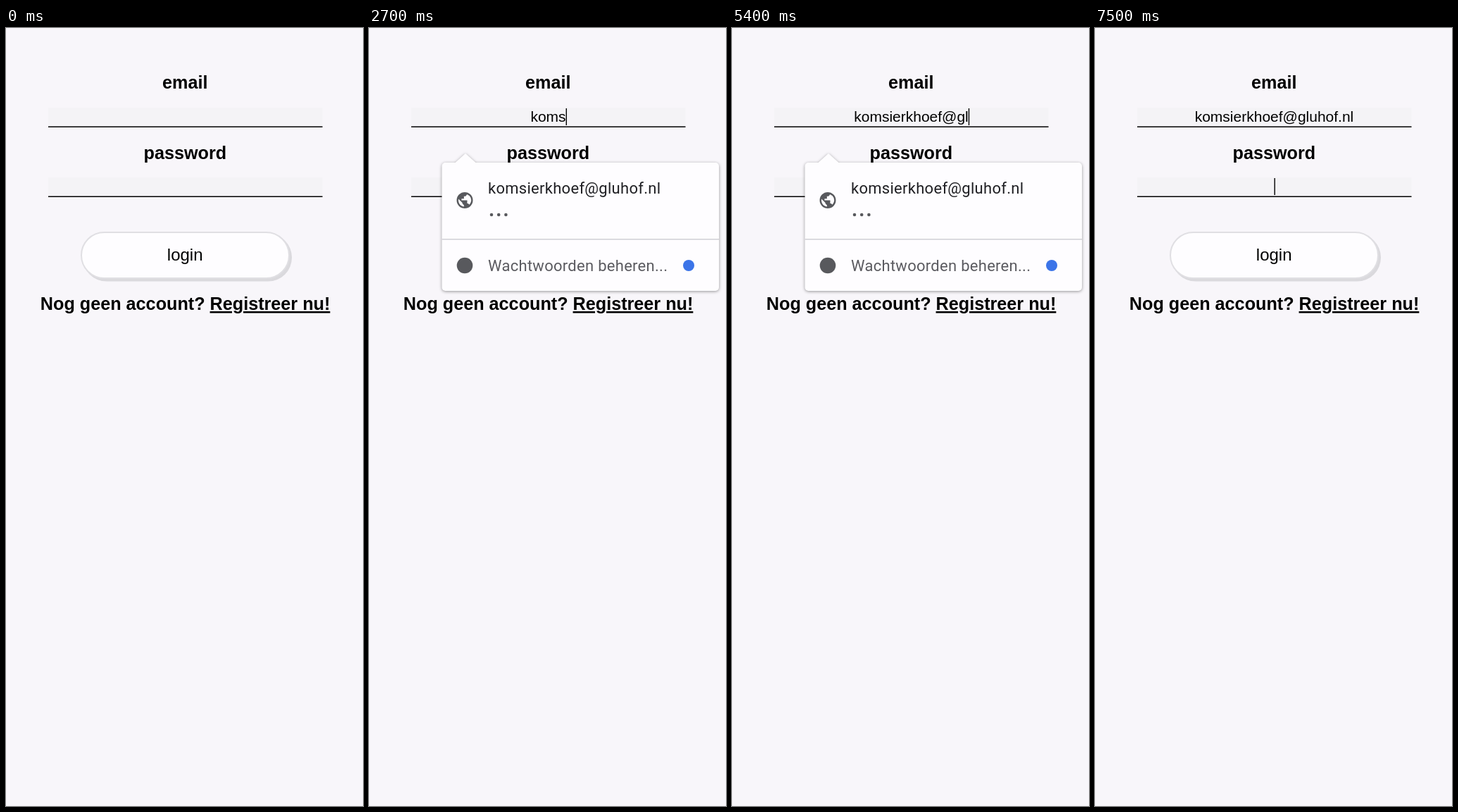
Write an HTML page that moves like this. It is 507 px wide and 1104 px high and loops after 8000 ms.

```html
<!DOCTYPE html>
<html lang="nl">
<head>
<meta charset="utf-8">
<title>Login</title>
<style>
  html, body { margin: 0; width: 100%; height: 100%; overflow: hidden; background: #f8f6fa; }
  svg { display: block; width: 507px; height: 1104px; }
  text { font-family: "Liberation Sans", Arial, sans-serif; text-anchor: middle; }
  .bold { font-size: 25.2px; font-weight: bold; }
  .login { font-size: 24px; }
  .typed { font-size: 21px; }
  .link { text-decoration: underline 1.8px; text-underline-offset: 2px; }
  .popup text { font: 22px Roboto, sans-serif; letter-spacing: .28px; text-anchor: start; }
  .panel { fill: #fefdff; filter: drop-shadow(0 1px 2px #0006); }
  .icon { fill: #58595d; }
</style>
</head>
<body>
<svg viewBox="0 0 507 1104">
  <defs>
    <g id="field">
      <rect width="389.5" height="27" fill="#f4f3f6"/>
      <rect y="26.5" width="389.5" height="1.5"/>
    </g>
  </defs>

  <text class="bold" x="254.3" y="86">email</text>
  <use href="#field" x="60" y="113"/>
  <text class="bold" x="254.3" y="185.5">password</text>
  <use href="#field" x="60" y="212"/>

  <rect x="109" y="292" width="297" height="67.5" rx="33.7" fill="#dad9dd"/>
  <rect x="107" y="290" width="295" height="65" rx="32.5" fill="#fefdff" stroke="#e0dfe3" stroke-width="2"/>
  <text class="login" x="254.2" y="330">login</text>
  <text class="bold" x="254.6" y="400">Nog geen account? <tspan class="link">Registreer nu!</tspan></text>

  <text class="typed" id="typed" x="254.5" y="133"></text>
  <rect id="caret" width="1.4" height="24"/>

  <g class="popup" id="popup">
    <g class="panel">
      <rect x="103.5" y="191" width="393.5" height="182" rx="5"/>
      <path d="M122 191.5L137 178L152 191.5Z"/>
    </g>
    <rect x="103.5" y="299" width="393.5" height="1.6" fill="#d3d2d7"/>
    <g transform="translate(122.2 230.7) scale(1.15)">
      <circle class="icon" cx="12" cy="12" r="9"/>
      <path fill="#fefdff" d="M3.5 9.5L9 15V16L11 18V20.5L5 18Z M18 17.5L16 16H15V12H8V10H11V7H13L15 4.5L20 7.5L21 12Z"/>
      <circle cx="12" cy="12" r="9" fill="none" stroke="#58595d" stroke-width="2"/>
    </g>
    <text id="saved" x="169" y="235" fill="#202024"></text>
    <path d="M174 265h22" fill="none" stroke="#58595d" stroke-width="4.6" stroke-linecap="round" stroke-dasharray="0 10.2"/>
    <circle class="icon" cx="136" cy="337" r="11.3"/>
    <text x="169" y="345" fill="#5b5b60">Wachtwoorden beheren...</text>
    <circle cx="454" cy="337" r="8" fill="#3b74e8"/>
  </g>

  <circle id="pointer" r="16" fill="#8a888c" stroke="#fdfcfe" stroke-width="1.5"/>
</svg>
<script>
  const LOOP = 8000, CENTER = 254.5;
  const ADDRESS = "komsierkhoef@gluhof.nl";
  const OPEN = 900, TYPING = 1800, SUBMIT = 7500;

  // Runs of evenly spaced key presses, with pauses between them
  const BURSTS = [
    { from: TYPING, to: 2100, keys: 3 },
    { from: 2520, to: 4000, keys: 9 },
    { from: 4800, to: 4900, keys: 1 },
    { from: 5100, to: 6000, keys: 6 },
    { from: 6000, to: 6900, keys: 3 },
  ];

  const [typed, caret, popup, saved, pointer] =
    ["typed", "caret", "popup", "saved", "pointer"].map(id => document.getElementById(id));
  const progress = (t, from, to) => Math.min(1, Math.max(0, (t - from) / (to - from)));
  const smooth = p => p * p * (3 - 2 * p);
  const show = (node, on) => node.setAttribute("visibility", on ? "visible" : "hidden");
  const place = (node, x, y) => node.setAttribute("transform", `translate(${x} ${y})`);

  saved.textContent = ADDRESS;

  function draw(t) {
    const count = BURSTS.reduce((sum, { from, to, keys }) =>
      sum + Math.floor(keys * progress(t, from, to)), 0);
    typed.textContent = ADDRESS.slice(0, count);
    const half = count ? typed.getComputedTextLength() / 2 : 0;
    if (t < SUBMIT) place(caret, CENTER + half, 114);
    else place(caret, CENTER, 213);
    show(caret, t >= OPEN);
    show(popup, t >= OPEN && t < SUBMIT);

    // The pointer slides in, rests, then moves onto the email field
    const enter = smooth(progress(t, 200, 400));
    const aim = smooth(progress(t, 500, 1000));
    place(pointer, 540 - 66.5 * enter - 122.5 * aim, 63.5 + 60.5 * aim);
    show(pointer, t < TYPING);
  }

  function tick() {
    draw(performance.now() % LOOP);
    requestAnimationFrame(tick);
  }
  tick();
</script>
</body>
</html>
```
